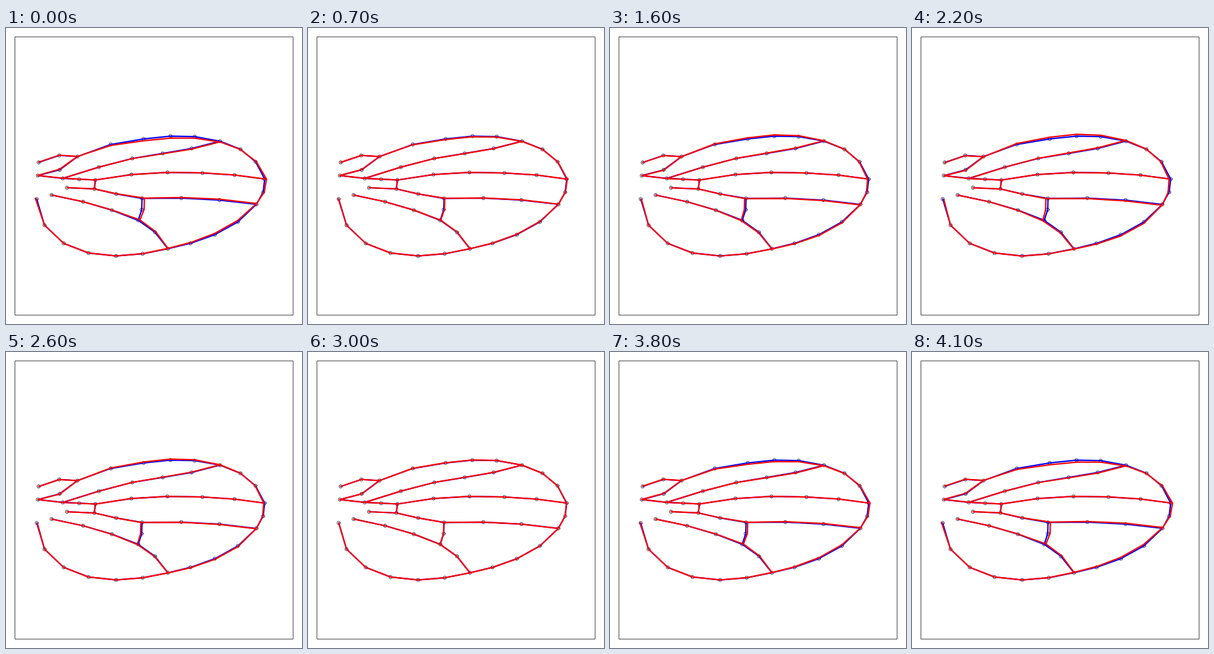
An HTML page that plays this animation: 480x480 px, repeating every 4.2 s.

```html
<!DOCTYPE html>
<html lang="en">
<head>
<meta charset="utf-8">
<title>Wing shape variation</title>
<style>
  html, body { margin: 0; width: 100%; height: 100%; overflow: hidden; background: #fff; }
  svg { display: block; width: 480px; height: 480px; }
  path, circle, rect { fill: none; stroke-linecap: round; stroke-linejoin: round; }
  rect, circle { stroke: #000; stroke-width: .75; }
  path { stroke-width: 2.25; }
</style>
</head>
<body>
<svg viewBox="0 0 480 480">
  <rect x="14.9" y="14.4" width="450.7" height="451.2"/>
  <g id="marks"></g>
  <path id="mean" stroke="#00f"/>
  <path id="shape" stroke="#f00"/>
</svg>
<script>
// Junctions shared by several veins
const shoulder = [116, 208.5], root = [51.6, 239.3], fork = [92.1, 243.9], knot = [145, 246.5],
  bridge = [143.3, 261], crest = [347, 183.5], tip = [419.5, 245], heel = [406, 286],
  top1 = [220.6, 276.3], low1 = [214.4, 311.9], base = [262.6, 358];
const gap = null; // landmark interpolated from its neighbours

const veins = [
  [[53, 218], [86.4, 206.7], shoulder],
  [shoulder, [170, 188.8], [223.3, 179.9], gap, [306, 176.2], crest, gap, [404.6, 216.8],
    tip, [417, 266.3], heel, [376, 314.5], gap, [299.2, 349.2], base, gap,
    [178.6, 369.7], gap, [93.6, 349.2], [62.5, 319.8], [49.8, 277.3]],
  [shoulder, [87, 230], root],
  [root, fork],
  [fork, gap, knot],
  [knot, [203.4, 237.6], gap, [318.6, 235.1], gap, tip],
  [fork, gap, [204.9, 211.5], gap, [301, 195.3], crest],
  [knot, bridge],
  [[99, 259], bridge, gap, top1, [284.3, 275.8], gap, heel],
  [top1, [220.1, 294.6], low1],
  [[74, 270.9], gap, [171.8, 295.4], low1, [241.5, 331.2], base]
].map(fillGaps);

// Lagrange curve through the two nearest known landmarks on each side
function fillGaps(vein) {
  const known = [...vein.keys()].filter(i => vein[i]);
  return vein.map((p, t) => {
    if (p) return p;
    const near = [...known.filter(i => i < t).slice(-2), ...known.filter(i => i > t).slice(0, 2)];
    const weight = i => near.reduce((w, j) => j === i ? w : w * (t - j) / (i - j), 1);
    return [0, 1].map(axis => near.reduce((sum, i) => sum + weight(i) * vein[i][axis], 0));
  });
}

// Regions of the wing that move: centre, radii, displacement
const bumps = [
  { x: 238, y: 170, rx: 125, ry: 26, dx: 0, dy: 3.6 },
  { x: 222, y: 285, rx: 35, ry: 50, dx: 4, dy: 0 },
  { x: 360, y: 316, rx: 120, ry: 48, dx: 0, dy: -2.6 },
  { x: 425, y: 240, rx: 30, ry: 40, dx: 3.1, dy: .3 },
  { x: 46, y: 276, rx: 20, ry: 25, dx: -2.2, dy: -1.2 },
  { x: 90, y: 222, rx: 40, ry: 16, dx: 0, dy: -1.3 }
];

function warp([x, y], amp) {
  let px = x, py = y;
  for (const b of bumps) {
    const g = amp * Math.exp(-(((x - b.x) / b.rx) ** 2) - ((y - b.y) / b.ry) ** 2);
    px += g * b.dx;
    py += g * b.dy;
  }
  return px.toFixed(2) + " " + py.toFixed(2);
}

const byId = id => document.getElementById(id);
const outline = amp => veins.map(v => "M" + v.map(p => warp(p, amp)).join("L")).join("");

byId("marks").innerHTML = [...new Set(veins.flat())]
  .map(([x, y]) => `<circle cx="${x}" cy="${y}" r="2.7"/>`).join("");
byId("mean").setAttribute("d", outline(0));

const STEP = 100, COUNT = 42, HALF = 10;

// Amplitude runs 1 to -1 in equal steps, then back, holding at each end
function draw(time) {
  const k = Math.floor(time / STEP) % COUNT;
  const amp = 1 - Math.min(k, COUNT - 1 - k) / HALF;
  byId("shape").setAttribute("d", outline(amp));
}

const start = performance.now();
function tick() {
  draw(performance.now() - start);
  requestAnimationFrame(tick);
}
tick();
</script>
</body>
</html>
```
